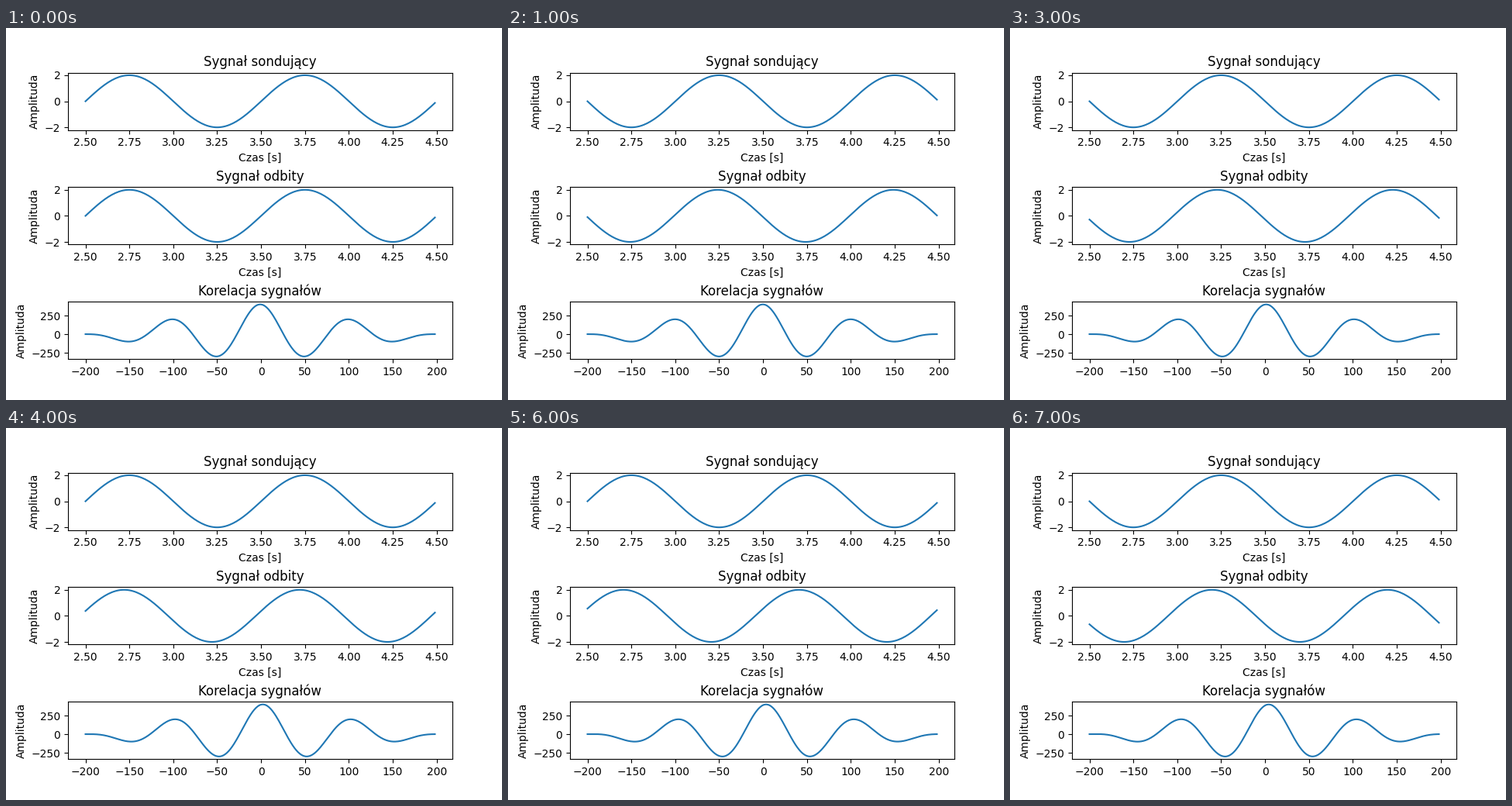
Animation, 640 px wide and 480 px high, one loop 8 s. Source, as a matplotlib script:

```python
import numpy as np
import matplotlib.pyplot as plt
from matplotlib.animation import FuncAnimation

plt.rcParams["font.family"] = "DejaVu Sans"

STEPS = 8
STEP_TIME = 0.5       # seconds of signal between steps
STEP_SHIFT = 0.0075   # echo lead gained at every step
AMPLITUDE = 2

t = 2.5 + np.arange(200) * 0.01
lags = np.arange(-200, 199)


def signals(step):
    start = t - 2.5 + step * STEP_TIME
    sent = AMPLITUDE * np.sin(2 * np.pi * start)
    echo = AMPLITUDE * np.sin(2 * np.pi * (start + step * STEP_SHIFT))
    return sent, echo, np.correlate(sent, echo, "full")


fig, axes = plt.subplots(3, 1, figsize=(6.4, 4.8), dpi=100)
fig.subplots_adjust(left=0.125, right=0.9, bottom=0.11, top=0.88, hspace=1)

titles = ("Sygnał sondujący", "Sygnał odbity", "Korelacja sygnałów")
lines = []
for ax, title, x, y in zip(axes, titles, (t, t, lags), signals(0)):
    lines += ax.plot(x, y)
    ax.set_title(title)
    ax.set_ylabel("Amplituda")
for ax in axes[:2]:
    ax.set_xlabel("Czas [s]")


def update(step):
    for line, y in zip(lines, signals(step)):
        line.set_ydata(y)
    return lines


anim = FuncAnimation(fig, update, frames=STEPS, interval=1000, repeat=True)
plt.show()
```
